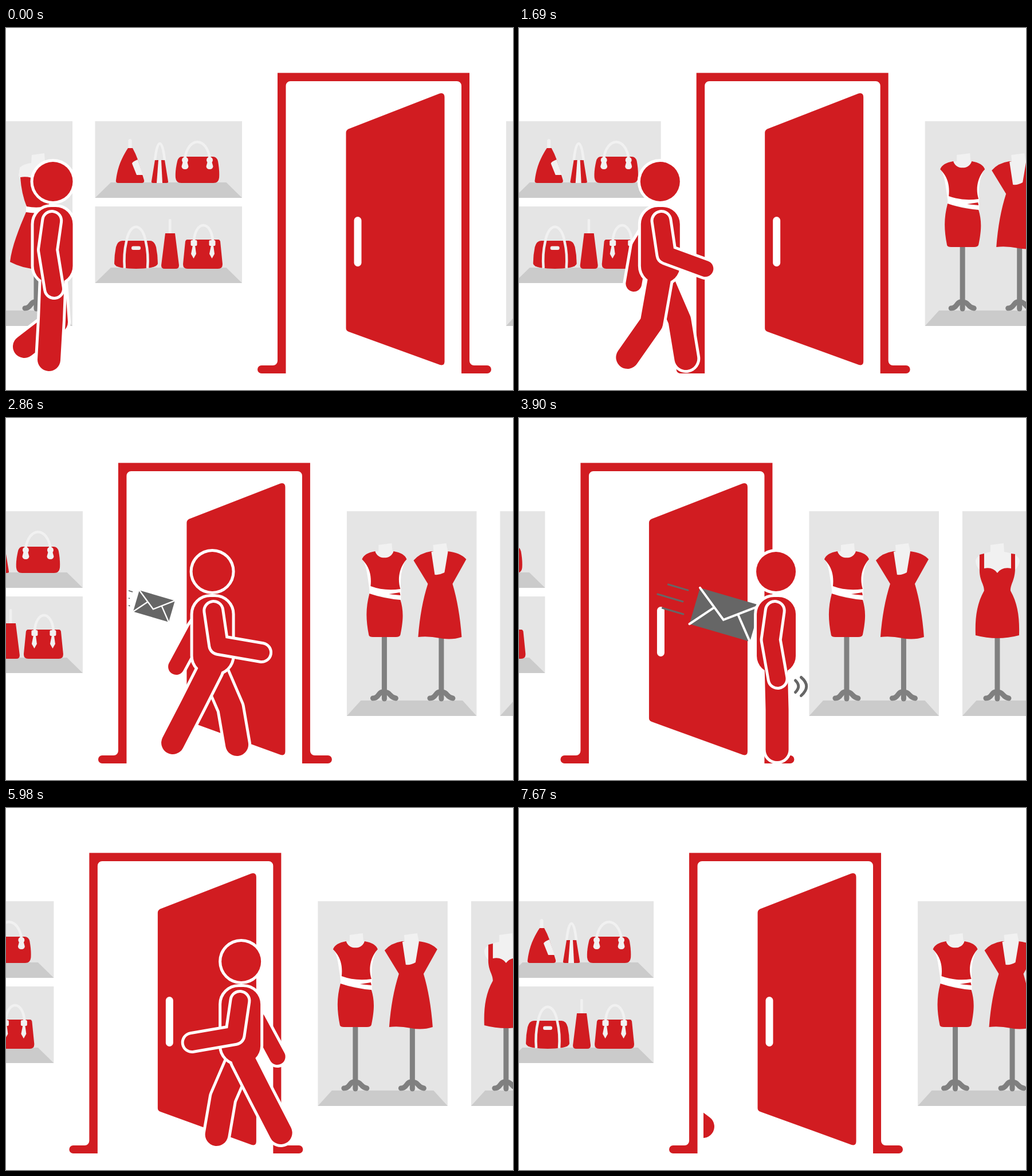
Write an HTML page that moves like this. It is 885x633 px and loops after 7800 ms.

```html
<!DOCTYPE html>
<html lang="en">
<head>
<meta charset="utf-8">
<title>Shop walk</title>
<style>
html, body { margin: 0; width: 100%; height: 100%; overflow: hidden; background: #fff; }
svg { display: block; width: 100vw; height: 100vh; }
.red { fill: #d11c21; }
.wall { fill: #e5e5e5; }
.floor { fill: #cbcbcb; }
.pale { fill: #f1f1f1; }
.white { fill: #fff; }
.strap { fill: none; stroke: #f1f1f1; stroke-width: 4.5; }
.metal { fill: none; stroke: #808080; stroke-width: 9; stroke-linecap: round; }
.dark { fill: none; stroke: #666; stroke-linecap: round; }
.fold { fill: none; stroke: #fff; stroke-width: 4; stroke-linecap: round; }
.limb { fill: none; stroke: #d11c21; stroke-linecap: round; stroke-linejoin: round; }
.halo { stroke: #fff; }
.arm { stroke-width: 28; }
.leg { stroke-width: 40; }
.arm.halo { stroke-width: 38; }
.leg.halo { stroke-width: 50; }
.edge { fill: #fff; stroke: #fff; stroke-width: 10; }
</style>
</head>
<body>
<svg viewBox="0 0 885 633" preserveAspectRatio="none">
<defs>
  <g id="stand">
    <path class="metal" stroke-width="8.500" stroke-linecap="butt" d="M0 370V491"/>
    <path class="metal" d="M-20 490Q-14 490-10 484T0 479Q6 479 10 484T20 490"/>
  </g>
  <g id="window">
    <path class="wall" d="M0 163H226.500V521H0z"/>
    <path class="floor" d="M24.500 494H202L226.500 521H0z"/>
  </g>
  <g id="shelf">
    <path class="wall" d="M155.500 163H412V297H155.500z"/>
    <path class="floor" d="M183 270H384.500L412 297H155.500z"/>
  </g>
  <clipPath id="mailClip"><rect id="mailBox" y="0" height="633"/></clipPath>
  <clipPath id="exitClip"><rect id="exitBox" y="0" width="1800" height="633"/></clipPath>
</defs>

<g id="scene">
  <use href="#window" x="-110.500"/>
  <g transform="translate(55)">
    <use href="#stand" x="-2"/>
    <path class="pale" d="M-10 222L12 219 13 234Q33 239 35 250L29 266H-30L-33 258-31 244Q-25 238-11 236z"/>
    <path class="white" d="M-20 308H19V330H-20z"/>
    <path class="red" d="M-30 261Q-16 258 0 266 15 258 30 261 26 290 19 311 0 316-19 312-28 290-30 261zM-20 322C-32 350-45 382-48 409Q0 434 48 409C44 385 32 345 20 319Q0 326-20 322z"/>
  </g>

  <use href="#shelf"/>
  <use href="#shelf" y="149"/>

  <path class="red" d="M213 210H221Q226 219 230 230L241 266Q242 271 237 271H196Q191 271 192 266C195 240 205 222 213 210z"/>
  <path class="pale" d="M213.500 210V196Q216.500 192 219.500 196V210zM220 237Q220 234 230 230L239 257H228z"/>

  <path class="red" d="M260 231H277L283 268Q284 271 280 271H257Q253 271 254 268z"/>
  <path class="pale" d="M266 231H271L273 271H263z"/>
  <path class="strap" d="M260 231C262 212 265 202 268.500 202S275 212 277 231"/>

  <path class="red" d="M307 225H361Q368 225 370 233 373 250 372 262 371 271 362 271H306Q297 271 296 262 295 250 299 233 301 225 307 225z"/>
  <path class="strap" d="M312 230C317 189 351 189 356 230"/>
  <g id="charm" class="pale"><circle cx="312.500" cy="231" r="5.500"/><path d="M309 233H316L318.500 242Q318 247 312.500 247T306.500 242z"/></g>
  <use href="#charm" x="43"/>

  <path class="red" d="M203 372H251Q259 372 262 383 265 397 265 412 264 417 253 419 227 423 201 419 190 417 189 412 189 397 192 383 195 372 203 372z"/>
  <path class="strap" d="M207 420Q205 395 210 374C216 339 238 339 244 374Q249 395 247 420"/>
  <rect class="pale" x="219" y="381.500" width="16" height="6.500" rx="3"/>

  <path class="red" d="M278 359H295L302 415Q302 421 296 421H277Q271 421 271 415z"/>
  <path class="pale" d="M284 359V335Q286 333 288.500 335V359z"/>

  <path class="red" d="M316 370H371Q373 370 374 373L378 413Q378 421 370 421H317Q309 421 309 413L313 373Q314 370 316 370z"/>
  <path class="strap" d="M328 372C331 336 358 336 361 372"/>
  <g id="tassel" class="pale"><rect x="322.500" y="371" width="11" height="10" rx="2"/><path d="M326 380H330L332 395 327.500 403 323 395z"/></g>
  <use href="#tassel" x="32"/>

  <use href="#window" x="873"/>
  <g transform="translate(938.500)">
    <use href="#stand"/>
    <path class="white" d="M-38 248C-31 256-29 280-26 300V308L29 319V300C27 280 31 258 38 248z"/>
    <path class="pale" d="M-10 222L13 219 14 232 17 234V250H-17V234L-10 233z"/>
    <path class="red" d="M-16 233Q-35 236-39 247C-26 260-22 275-24 294Q0 303 28 299C22 280 27 260 39 247Q35 236 16 233A16.300 14 0 0 1-16 233zM-26 307C-32 330-33 350-27 380Q-26 383-20 383H20Q27 383 28 379C34 350 33 335 28 318Q0 316-26 307zM8 308L27 305 28 310z"/>
  </g>
  <g transform="translate(1035.500)">
    <use href="#stand" x="2.500"/>
    <path class="red" d="M-15 233Q-35 236-46 249L-21 290Q-34 330-38 383-20 381 0 385T38 383Q34 330 22 290L46 247Q35 235 13 233z"/>
    <path class="pale" d="M-12 222L11 219 14 234 8 270Q0 275-9 274L-15 234-11 233z"/>
  </g>

  <use href="#window" x="1140.500"/>
  <g transform="translate(1201.500)">
    <use href="#stand"/>
    <path class="pale" d="M-12 222L11 219 12 234Q38 238 39 250 37 262 28 268V280H-28V268Q-37 262-38 250-37 239-12 234z"/>
    <path class="red" d="M-31 239L-23 237V263Q-8 260 0 271 8 260 24 263V237L31 238V266C30 285 23 290 23 302C36 325 39 350 38 380Q0 390-38 380C-39 350-36 325-23 302C-23 290-31 285-31 266z"/>
  </g>

  <path class="red" d="M474 78.500H809V582a8 8 0 0 0 8 8H840a7 7 0 0 1 0 14H795V101a8 8 0 0 0-8-8H496.500a8 8 0 0 0-8 8V604H446a7 7 0 0 1 0-14H466a8 8 0 0 0 8-8z"/>
  <path class="red" d="M593.500 183Q593.500 178.500 598 176.500L757 114.500Q765.500 112.500 765.500 121V583Q765.500 591 757.500 589L598 531Q593.500 529 593.500 525z"/>
  <rect class="white" x="607.500" y="330" width="13" height="87" rx="6.500"/>
</g>

<g clip-path="url(#mailClip)">
  <g id="mail">
    <path fill="#666" d="M-55-33H55V33H-55z"/>
    <path class="fold" d="M-55-33L0 9.300 55-33M-55 33L-22-6.500M55 33L22-6.500"/>
    <path class="dark" stroke-width="3" d="M-110-23H-74M-123-1.500H-77M-108 19.400H-70"/>
  </g>
</g>

<path id="wave1" class="dark" stroke-width="5" d="M482.500 459Q493 469 482.500 479.500"/>
<path id="wave2" class="dark" stroke-width="5" d="M492.500 453.500Q511 469 492.500 485.500"/>

<g id="exit">
  <g id="man">
    <path class="limb arm halo farArm"/><path class="limb arm farArm"/>
    <path class="limb leg halo farLeg"/><path class="limb leg farLeg"/>
    <path class="limb leg halo nearLeg"/>
    <rect class="edge" x="-33.500" y="313" width="68" height="133" rx="30"/>
    <circle class="edge" cy="268.500" r="34.500"/>
    <path class="limb leg nearLeg"/>
    <rect class="red" x="-33.500" y="313" width="68" height="133" rx="30"/>
    <circle class="red" cy="268.500" r="34.500"/>
    <path class="limb arm halo nearArm"/><path class="limb arm nearArm"/>
  </g>
</g>
</svg>

<script>
const TICK = 130, LOOP = 7800, STEP = 12.64, STOP = 29;
const $ = id => document.getElementById(id);
const PARTS = ['nearArm', 'farArm', 'nearLeg', 'farLeg'];

// Half a walk cycle; each limb is [mid x, mid y, end x, end y].
// The other half swaps near and far limbs.
const WALK = [
  [[-9, 388, 2, 456], [-5, 388, 0, 448], [-3, 510, -7, 580], [6, 514, -50, 557]],
  [[34, 393, 84, 424], [-27, 383, -45, 446], [-26, 510, -59, 566], [50, 502, 48, 570]],
  [[11, 397, 86, 410], [-28, 370, -63, 435], [-36, 504, -69, 568], [32, 507, 43, 571]],
  [[11, 396, 79, 421], [-35, 383, -46, 447], [-15, 516, -57, 576], [34, 511, 45, 578]],
  [[0, 393, 45, 446], [-20, 386, -25, 452], [-2, 512, -62, 557], [14, 510, 20, 580]]
];
const STAND = [[-9, 388, 3, 456], [-5, 388, 0, 448], [2, 510, 2, 580], [2, 510, 2, 580]];

function walkPose(i) {
  const [a, b, c, d] = WALK[i % 5];
  return i % 10 < 5 ? [a, b, c, d] : [b, a, d, c];
}

function setPose(pose) {
  PARTS.forEach((name, i) => {
    const [mx, my, ex, ey] = pose[i];
    const root = i < 2 ? [mx * 0.2, 337] : [mx * 0.1, 440];
    const d = `M${root}L${mx} ${my} ${ex} ${ey}`;
    document.querySelectorAll('.' + name).forEach(p => p.setAttribute('d', d));
  });
}

function show(id, on) {
  $(id).style.display = on ? '' : 'none';
}

function draw(n) {
  let back = n > 43 ? 3 + (n - 46) * 12 / 13 : 0;
  const steps = Math.min(n, STOP) - back;
  const shift = -STEP * steps;
  const manX = 82 + STEP * steps;
  const doorX = 474 + shift;

  $('scene').setAttribute('transform', `translate(${shift})`);
  $('man').setAttribute('transform', `translate(${manX}) scale(${back ? -1 : 1} 1)`);
  setPose(back ? walkPose(Math.round(back) - 1) : n < STOP ? walkPose(n) : STAND);

  // On the way back the walker vanishes at the doorway's left edge.
  $('exitBox').setAttribute('x', back ? doorX + 25 : -400);
  $('exit').setAttribute('clip-path', 'url(#exitClip)');

  const k = n - 30;
  const flying = n > 14 && n < 43;
  show('mail', flying);
  if (flying) {
    const size = Math.min(1, 1 + k * 0.0515);
    const x = 359.5 + k * STEP, y = 344 + k * 1.875;
    $('mail').setAttribute('transform', `translate(${x} ${y}) rotate(16.3) scale(${size})`);
    $('mailBox').setAttribute('x', doorX + 18);
    $('mailBox').setAttribute('width', Math.max(0, manX - doorX - 18));
  }

  const buzz = n >= STOP && n < 43 ? (n - STOP) % 4 : 3;
  show('wave1', buzz < 3);
  show('wave2', buzz === 1 || buzz === 2);
}

let last = -1;
const start = performance.now();
function tick(now) {
  const n = Math.floor(Math.max(0, now - start) % LOOP / TICK);
  if (n !== last) draw(last = n);
  requestAnimationFrame(tick);
}
draw(0);
requestAnimationFrame(tick);
</script>
</body>
</html>
```
